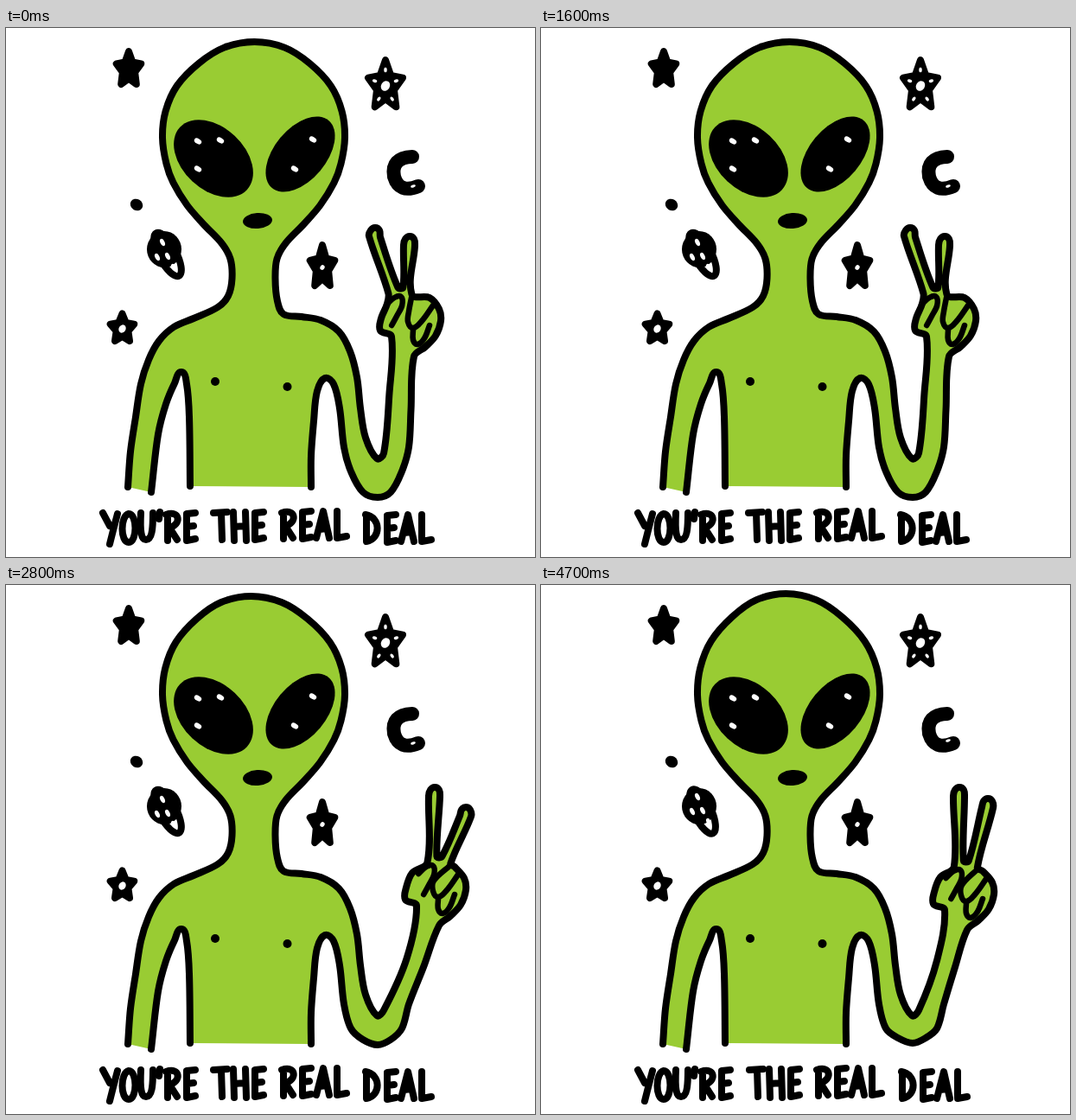
Write an HTML page that moves like this. It is 612 by 612 pixels and loops after 4800 ms.

```html
<!DOCTYPE html>
<html lang="en">
<head>
<meta charset="utf-8">
<title>Alien</title>
<style>
html, body { margin: 0; width: 100%; height: 100%; overflow: hidden; background: #fff; }
svg { display: block; width: 100vw; height: 100vh; }
.line { fill: none; stroke: #000; stroke-width: 8; stroke-linecap: round; stroke-linejoin: round; }
.fold { stroke-width: 6.5; }
.solid { fill: #000; }
.hole { fill: #fff; }
</style>
</head>
<body>
<svg id="stage" viewBox="0 0 612 612" role="img" aria-label="YOU'RE THE REAL DEAL"></svg>
<script>
const GREEN = '#99cc33';
const STEP = 100, FRAMES = 48, AXIS = 286.5;
const stage = document.getElementById('stage');

function add(parent, tag, attrs = {}) {
  const el = document.createElementNS('http://www.w3.org/2000/svg', tag);
  for (const key in attrs) el.setAttribute(key, attrs[key]);
  parent.appendChild(el);
  return el;
}

function blob(g, cx, cy, rx, ry, angle = 0, style = 'solid') {
  add(g, 'ellipse', { cx, cy, rx, ry, class: style, transform: `rotate(${angle} ${cx} ${cy})` });
}

// Smooth open curve; each tangent follows the neighbouring points.
function curve(pts) {
  const at = i => pts[Math.max(0, Math.min(pts.length - 1, i))];
  const handle = (p, from, to, len) => {
    const dx = to[0] - from[0], dy = to[1] - from[1], k = len / 3 / (Math.hypot(dx, dy) || 1);
    return (p[0] + dx * k).toFixed(1) + ',' + (p[1] + dy * k).toFixed(1);
  };
  let d = 'M' + pts[0];
  for (let i = 0; i < pts.length - 1; i++) {
    const a = at(i), b = at(i + 1), len = Math.hypot(b[0] - a[0], b[1] - a[1]);
    d += `C${handle(a, at(i - 1), b, len)} ${handle(b, at(i + 2), a, len)} ${b}`;
  }
  return d;
}

// Half of the head from crown to neck, as distance from the axis and height.
const profile = [[35, 20], [64, 39], [89, 66], [102, 96], [105.5, 127], [101, 157], [93, 179],
  [77, 205], [58, 227], [37, 249], [27, 267], [25, 290]];
const leftArm = [[141, 531], [144, 490], [150, 450], [156, 412], [165, 384], [177, 362], [194, 346],
  [217, 336], [245, 323], [257, 310]];
const leftPit = [[213, 530], [212, 450], [209, 412], [203, 398], [195, 411], [185, 435], [176, 470], [168, 537]];
const rightShoulder = [[314, 316], [321, 331], [342, 334], [364, 338], [385, 351], [398, 374], [406, 404],
  [410, 440], [416, 474], [429, 498], [437, 492]];
const rightPit = [[399, 513], [391, 485], [386, 440], [379, 412], [369, 405], [360, 420], [356, 455], [353, 495], [353, 531]];

// crown: shift of the head top; wrist: inner wrist; tips: finger ends from the wrist.
const poses = [
  { crown: [1, 3], wrist: [446, 358], tips: [[-19, -127], [21, -117]], elbow: 543 },
  { crown: [-11, 0], wrist: [456, 360], tips: [[-21, -127], [31, -112]], elbow: 535 },
  { crown: [-3, 0], wrist: [475, 372], tips: [[21, -138], [57, -115]], elbow: 532 },
  { crown: [-3, -3], wrist: [467, 377], tips: [[17, -143], [50, -130]], elbow: 530 }
];

function headSide(side, crown) {
  return profile.map(([w, y]) => {
    const lean = (Math.max(0, 127 - y) / 114) ** 2;
    return [AXIS + side * w + crown[0] * lean, y + crown[1] * lean];
  });
}

const finger = ([x, y]) => [[x - 7, y + 10], [x - 5, y + 3], [x, y], [x + 5, y + 3], [x + 6, y + 11]];

function handShape(tips, root) {
  return [[0, -1], [-13, -8], [-12, -22], [-5, -39], [root, -51],
    ...finger(tips[0]), [root + 11, -58], [root + 17, -58], ...finger(tips[1]),
    [root + 27, -50], [44, -46], [55, -33], [57, -19], [51, -2], [39, 11]];
}

function drawPose({ crown, wrist: [wx, wy], tips, elbow }) {
  const g = add(stage, 'g');
  const root = tips[0][0] * .4 + 4;
  const place = pts => pts.map(([x, y]) => [x + wx, y + wy]);
  const outer = [wx + 26, wy + 22];
  const outline = curve([
    ...leftArm, ...headSide(-1, crown).reverse(), [AXIS + crown[0], 13 + crown[1]],
    ...headSide(1, crown), ...rightShoulder, [437 + (wx - 437) * .7, (492 + wy) / 2],
    ...place(handShape(tips, root)), outer,
    [(465 + outer[0]) / 2, 442], [466, 485], [458, 513], [445, elbow - 6], [430, elbow], [413, elbow - 6],
    ...rightPit
  ]);
  const pit = curve(leftPit);
  add(g, 'path', { d: outline + pit.replace('M', 'L') + 'Z', fill: GREEN });
  for (const d of [outline, pit]) add(g, 'path', { d, class: 'line' });

  const slide = (root + 4) / 2;
  const thumb = [[-6, -38], [3, -46], [11, -47], [12, -37], [6, -25], [0, -14]].map(([x, y]) => [x + slide, y]);
  const knuckle = [[root + 27, -48], [20, -30], [19, -18], [25, -11], [35, -19], [48, -37]];
  const lastFinger = [[25, -9], [25, 3], [30, 8], [38, 1], [44, -14]];
  for (const fold of [thumb, knuckle, lastFinger])
    add(g, 'path', { d: curve(place(fold)), class: 'line fold' });

  blob(g, 240, 151, 53, 36, 43);
  blob(g, 340.5, 146, 51, 30, -50);
  for (const [x, y] of [[222, 131], [248, 130], [222, 163], [355, 129], [334, 163]])
    blob(g, x, y, 4.5, 3, 30, 'hole');
  blob(g, 291, 223, 17, 9, -4);
  blob(g, 242, 409, 5, 5);
  blob(g, 325.5, 415, 5, 5);
  return g;
}

function drawStar(g, cx, cy, rx, ry, hole, tipHoles) {
  const point = (i, r) => [cx + rx * r * Math.sin(i * Math.PI / 5), cy - ry * r * Math.cos(i * Math.PI / 5)];
  const corners = Array.from({ length: 10 }, (_, i) => point(i, i % 2 ? .5 : 1));
  add(g, 'path', { d: 'M' + corners.join('L') + 'Z', class: 'line', style: 'fill:#000' });
  if (hole) blob(g, cx, cy, hole, hole * 1.2, 30, 'hole');
  if (tipHoles) for (let i = 0; i < 10; i += 2) blob(g, ...point(i, .62), 1.8, 2.8, i * 36, 'hole');
}

function drawSky(second) {
  const tilt = second ? 3 : 0;
  const g = add(stage, 'g');
  drawStar(g, 142, 48, 15, 21);
  drawStar(g, 439, 67, 21, 30, 5, true);
  drawStar(g, 366, 277, 15, 26, 2.5);
  drawStar(g, 134.5, 348, 14.5, 17.5, 4);

  add(g, 'path', { d: 'M470,149Q445,150 449,172Q455,192 477,183', class: 'line', style: 'stroke-width:16' });
  blob(g, 471, 183 - tilt, 3, 1.5, -20, 'hole');
  blob(g, 151, 204.5, 7.5, 6.5, 30);

  blob(g, 183, 256, 20, 21);
  blob(g, 187, 262, 28, 10, 62 + tilt, 'line');
  for (const [x, y] of [[181, 248], [175, 265], [187, 264], [194, 277]])
    blob(g, x, y - tilt, 2.5, 4.5, -25, 'hole');
  return g;
}

// Strokes of each letter and the advance to the next one.
const letters = {
  Y: ['M0,0L8,15M17,1Q13,16 8,36', 22],
  O: ['M8,1C-2,3 -2,34 8,34C18,34 18,1 8,1Z', 22],
  U: ['M0,0C-1,20 0,31 6,31C13,31 14,18 14,0', 21],
  "'": ['M1,-1L0,7', 8],
  R: ['M2,2L2,32M0,2C17,-4 18,14 4,17L13,31', 23],
  E: ['M11,0L1,1L1,32L11,30M1,16L9,15', 17],
  T: ['M0,1L16,0M9,1L10,32', 23],
  H: ['M0,0L1,33M14,0L15,33M1,17L14,16', 24],
  A: ['M0,31L8,0L15,31M4,21L12,20', 24],
  L: ['M0,0L0,31L11,29', 0],
  D: ['M1,1L1,31M0,0C18,3 18,28 1,31', 24]
};
const words = [["YOU'RE", 112, 561], ['THE', 240, 560], ['REAL', 319, 559], ['DEAL', 416, 563]];

function drawLettering(second) {
  const g = add(stage, 'g');
  words.forEach(([word, x, y], i) => {
    let pen = x + (second ? i % 2 : 0);
    for (const char of word) {
      const [d, advance] = letters[char];
      add(g, 'path', { d, class: 'line', transform: `translate(${pen},${y})` });
      pen += advance;
    }
  });
  return g;
}

const skies = [false, true].map(drawSky);
const bodies = poses.map(drawPose);
const captions = [false, true].map(drawLettering);

const show = (groups, index) =>
  groups.forEach((g, i) => g.setAttribute('visibility', i === index ? 'visible' : 'hidden'));

function render(time) {
  const frame = Math.floor(time / STEP) % FRAMES;
  const pose = (frame >> 1) % poses.length;
  show(bodies, pose);
  show(skies, pose % 2);
  show(captions, frame % 2);
}

const start = performance.now();
function tick() {
  render(performance.now() - start);
  requestAnimationFrame(tick);
}
tick();
</script>
</body>
</html>
```
